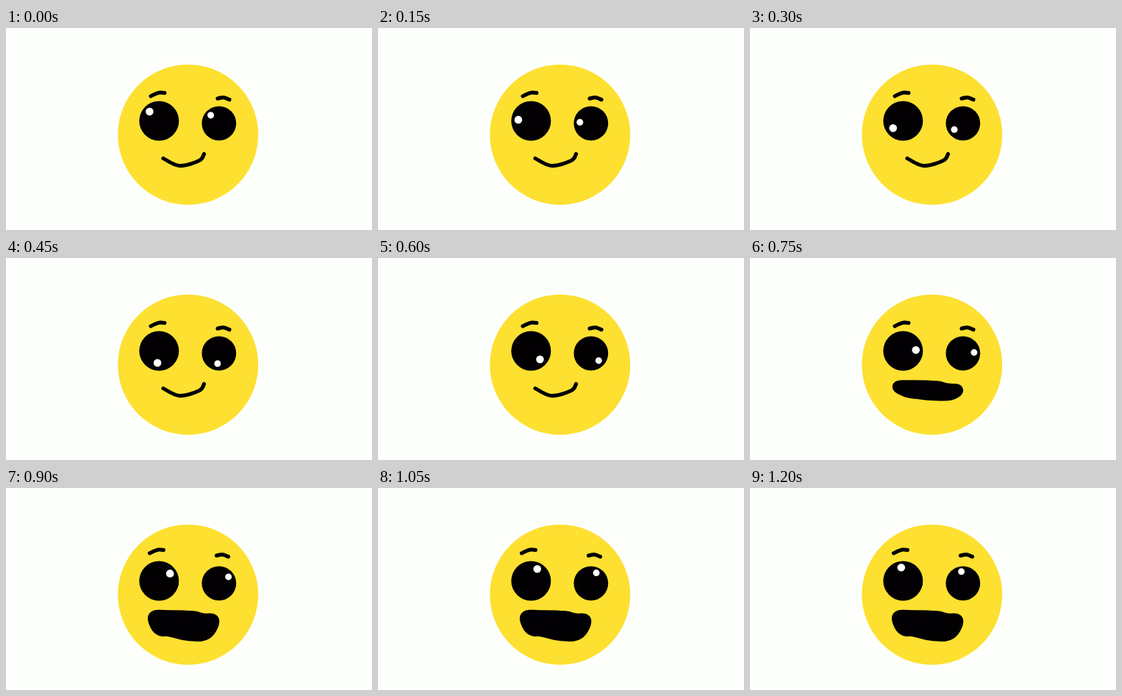
An HTML page with a canvas for the animation above (1350 ms loop, 498 by 275 pixels).

```html
<!DOCTYPE html>
<html lang="en">
<head>
<meta charset="utf-8">
<title>Smiley</title>
<style>
  html, body { margin: 0; width: 100%; height: 100%; overflow: hidden; background: #fdfffc; }
  canvas { display: block; width: 498px; height: 275px; }
</style>
</head>
<body>
<canvas id="stage" width="498" height="275"></canvas>
<script>
const ctx = document.getElementById('stage').getContext('2d');
const STEP = 150, STEPS = 9;
const WHITE = '#fdfffc', YELLOW = '#fde030', BLACK = '#020003';

const smile = [[214, 177.5], [236, 187.5], [263, 180.5], [269.5, 171.5]];
const brows = [
  [[197, 92.8], [207.5, 88.2], [215.8, 88.4]],
  [[288, 96], [296, 94.6], [304, 97.5]]
];

// Both open mouths share the upper lip and differ in the lower one
const upperLip = [[202, 175], [222, 174.3], [254, 175.3], [268, 178.5], [282, 180]];
const halfLip = [[272, 186], [250, 186.2], [232, 184.5], [213, 181.5]];
const wideLip = [[277, 194], [266, 200.7], [245, 199.7], [222, 194.3], [211, 193.7], [204, 187]];

function disc(x, y, r, color) {
  ctx.fillStyle = color;
  ctx.beginPath();
  ctx.arc(x, y, r, 0, Math.PI * 2);
  ctx.fill();
}

// Smooth curve through the points
function trace(pts, closed) {
  const n = pts.length;
  const at = i => pts[closed ? (i + n) % n : Math.max(0, Math.min(n - 1, i))];
  ctx.beginPath();
  ctx.moveTo(...pts[0]);
  for (let i = 0; i < (closed ? n : n - 1); i++) {
    const [a, b, c, d] = [at(i - 1), at(i), at(i + 1), at(i + 2)];
    ctx.bezierCurveTo(
      b[0] + (c[0] - a[0]) / 6, b[1] + (c[1] - a[1]) / 6,
      c[0] - (d[0] - b[0]) / 6, c[1] - (d[1] - b[1]) / 6,
      c[0], c[1]);
  }
}

function line(pts) {
  trace(pts, false);
  ctx.lineWidth = 5.2;
  ctx.stroke();
}

function mouth(lowerLip) {
  trace([...upperLip, ...lowerLip], true);
  ctx.lineWidth = 16;
  ctx.fillStyle = BLACK;
  ctx.fill();
  ctx.stroke();
}

// The glint circles the pupil anticlockwise
function eye(x, y, r, glint, angle) {
  const orbit = r * 0.645;
  disc(x, y, r, BLACK);
  disc(x + orbit * Math.cos(angle), y - 1 - orbit * Math.sin(angle), glint, WHITE);
}

function draw(step) {
  ctx.fillStyle = WHITE;
  ctx.fillRect(0, 0, 498, 275);
  disc(247.7, 145.2, 95.5, YELLOW);

  // Steady turn with a rush as the mouth opens
  const rush = 23 * Math.exp(-(((step - 4.9) / 1.5) ** 2));
  const angle = (138 + 360 / STEPS * step + rush) * Math.PI / 180;
  eye(208.3, 126.5, 27, 5.3, angle);
  eye(289.8, 129.8, 23.4, 4.5, angle);

  ctx.strokeStyle = BLACK;
  ctx.lineCap = ctx.lineJoin = 'round';
  const wide = step > 5;
  const [dx, dy] = wide ? [-1.5, -4] : [0, 0];
  for (const brow of brows) line(brow.map(([x, y]) => [x + dx, y + dy]));

  if (step < 5) line(smile);
  else mouth(wide ? wideLip : halfLip);
}

const start = performance.now();
function tick() {
  const t = performance.now() - start;
  draw(Math.floor(t / STEP) % STEPS);
  requestAnimationFrame(tick);
}
tick();
</script>
</body>
</html>
```
